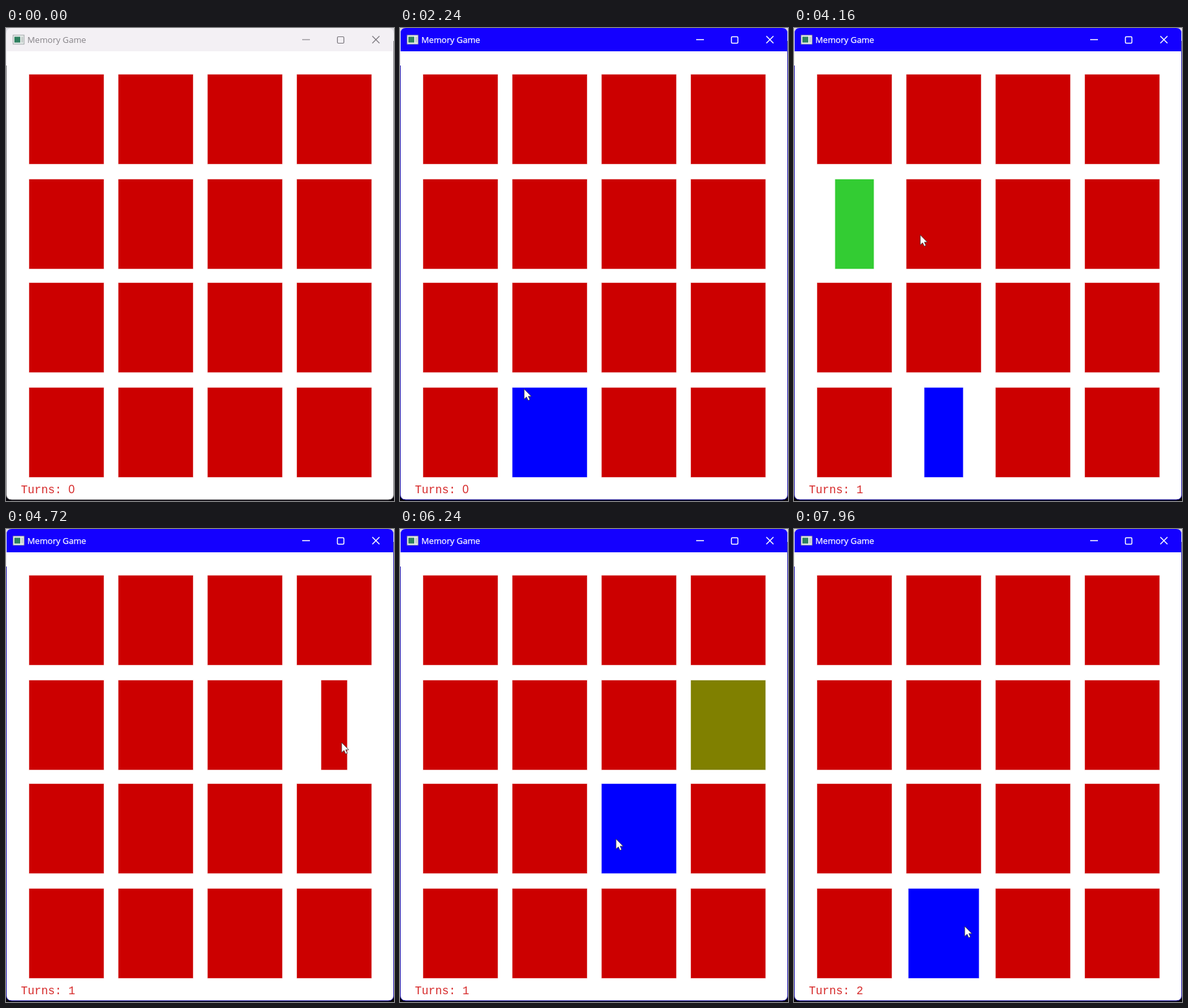
An HTML page for the animation above (8 s loop, 600x731 px).

```html
<!DOCTYPE html>
<html lang="en">
<head>
<meta charset="utf-8">
<title>Memory Game</title>
<style>
  html, body { margin: 0; width: 100%; height: 100%; overflow: hidden; background: #fff; }
  svg { display: block; width: 600px; height: 731px; }
  #title { font: 13.1px "Open Sans", sans-serif; fill: #858287; }
  #bar { fill: #f3f0f4; }
  #controls { fill: none; stroke: #77747a; stroke-width: 1.2; }
  #border { fill: none; stroke: #77757a; }
  .active #title { fill: #fff; stroke: #fff; stroke-width: .25; }
  .active #bar { fill: #1400ff; }
  .active #controls { stroke: #fff; stroke-width: 1.5; }
  .active #border { stroke: #1a10b0; }
  #turns { font: 17.5px "Liberation Mono", monospace; fill: #d62a2a; }
  #turns .zero { font-family: "Liberation Sans", sans-serif; }
  #cards rect { stroke-opacity: .5; }
</style>
</head>
<body>
<svg id="stage" viewBox="0 0 600 731">
  <rect width="600" height="731" fill="#08060c"/>
  <path d="M0 0H600V20H0ZM0 20H1V58H0Z" fill="#dedbe2"/>
  <rect x=".5" y=".5" width="599" height="728.5" rx="8" fill="#fff"/>
  <path id="bar" d="M1 36V8Q1 0 9 0H591Q599 0 599 8V36Z"/>
  <path id="border" d="M.5 58V721Q.5 729 9 729H591Q599.5 729 599.5 721V36"/>
  <g id="icon">
    <rect x="11" y="11" width="17" height="14" fill="#e9eeec" stroke="#8b9295" stroke-width=".8"/>
    <rect x="13" y="13.5" width="9" height="9" fill="#2f8060"/>
    <rect x="23.5" y="13.5" width="3" height="9" fill="#c3cbc9"/>
  </g>
  <text id="title" x="33" y="23">Memory Game</text>
  <g id="controls">
    <path d="M458 18H470M566.5 12.5L577.5 23.5M577.5 12.5L566.5 23.5"/>
    <rect x="512.5" y="13.5" width="10" height="10" rx="1.5"/>
  </g>
  <g id="cards"></g>
  <text id="turns" x="23" y="718.5">Turns: <tspan id="count" x="96.5">0</tspan></text>
  <path id="cursor" d="M0 0V15.5L3.7 12.2L6.2 17.6L8.8 16.4L6.4 11.2H11Z"
        fill="#fff" stroke="#333" stroke-width=".8" stroke-linejoin="round"/>
</svg>
<script>
const LOOP = 8000, FLIP = 500, FOCUS = 1440;
const BACK = '#cc0000', BLUE = '#0000ff', GREEN = '#33cc33', OLIVE = '#808000';
const CARD_W = 115, ROWS = [72, 234, 394, 556];
const HIDES = [4040, 6760];

// column, row, face colour, show time, hide time
const FLIPS = [
  [1, 3, BLUE, FOCUS, HIDES[0]],
  [0, 1, GREEN, 2880, HIDES[0]],
  [3, 1, OLIVE, 4557, HIDES[1]],
  [2, 2, BLUE, 5600, HIDES[1]],
  [1, 3, BLUE, 7475, Infinity]
];

// time, x, y of the pointer tip
const PATH = [
  [1000, 252, 731], [1360, 205, 610], [1800, 200, 600], [2240, 192, 558],
  [2360, 188, 535], [2780, 97, 312], [3760, 97, 312], [4060, 140, 318],
  [4480, 519, 330], [5040, 519, 330], [5500, 334, 479], [6440, 334, 479],
  [6960, 322, 506], [7280, 315, 528], [7440, 264, 614], [8000, 264, 614]
];

const $ = id => document.getElementById(id);
const clamp = v => Math.max(0, Math.min(1, v));
const ease = u => u * u * (3 - 2 * u);

function set(el, attrs) {
  for (const name in attrs) el.setAttribute(name, attrs[name]);
}

const cards = ROWS.map(y => [0, 1, 2, 3].map(() => {
  const card = document.createElementNS('http://www.w3.org/2000/svg', 'rect');
  set(card, { y, height: 138 });
  return $('cards').appendChild(card);
}));

function drawCard(col, row, turn, face) {
  const width = CARD_W * Math.abs(1 - 2 * turn);
  const colour = turn < .5 ? BACK : face;
  set(cards[row][col], {
    x: 36 + 138 * col + (CARD_W - width) / 2, width, fill: colour, stroke: colour
  });
}

function drawCursor(t) {
  $('cursor').style.display = t < PATH[0][0] ? 'none' : '';
  const i = PATH.findIndex(p => p[0] > t);
  if (i < 1) return;
  const [t0, x0, y0] = PATH[i - 1], [t1, x1, y1] = PATH[i];
  const u = ease((t - t0) / (t1 - t0));
  set($('cursor'), { transform: `translate(${x0 + (x1 - x0) * u} ${y0 + (y1 - y0) * u})` });
}

function draw(t) {
  $('stage').classList.toggle('active', t >= FOCUS);
  const turns = HIDES.filter(h => t >= h).length;
  $('count').textContent = turns;
  $('count').classList.toggle('zero', turns === 0);
  cards.forEach((line, row) => line.forEach((_, col) => drawCard(col, row, 0, BACK)));
  for (const [col, row, face, show, hide] of FLIPS) {
    if (t < show || t > hide + FLIP) continue;
    drawCard(col, row, clamp((t - show) / FLIP) - clamp((t - hide) / FLIP), face);
  }
  drawCursor(t);
}

const start = performance.now();
function tick() {
  draw((performance.now() - start) % LOOP);
  requestAnimationFrame(tick);
}
tick();
</script>
</body>
</html>
```
